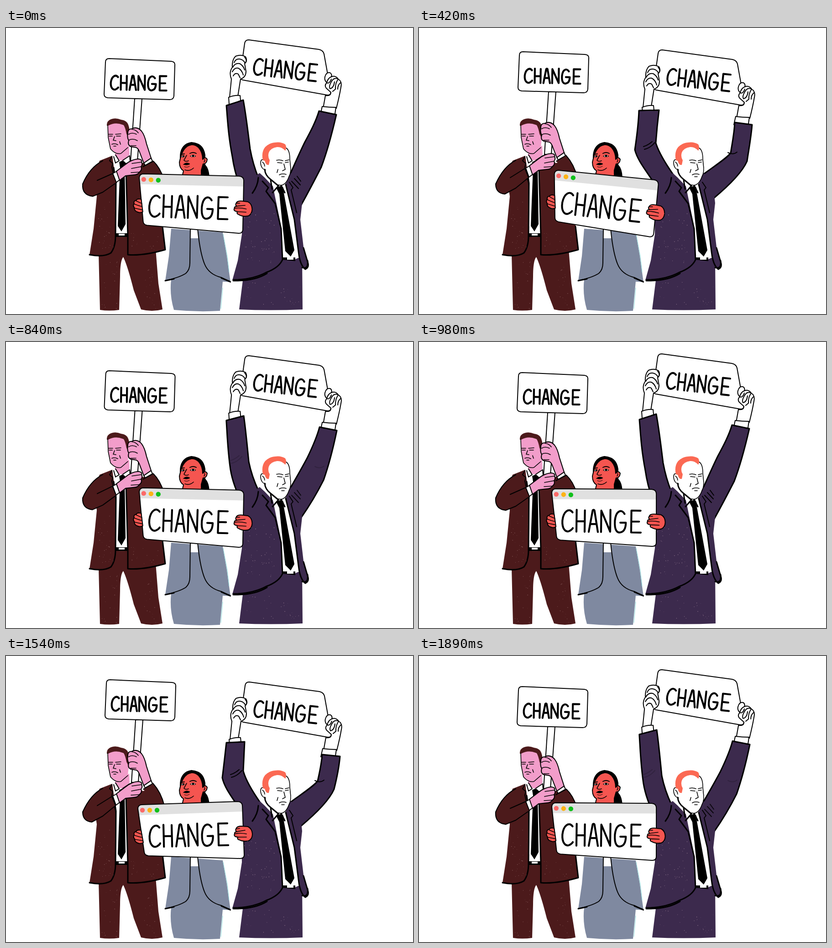
An HTML page that plays this animation: 892 by 627 pixels, repeating every 1960 ms.

```html
<!DOCTYPE html>
<html lang="en">
<head>
<meta charset="utf-8">
<title>Change</title>
<style>
html, body { margin: 0; width: 100%; height: 100%; overflow: hidden; background: #fff; }
svg { display: block; width: 100%; height: 100%; }
.ink { fill: none; stroke: #000; stroke-width: 2; stroke-linecap: round; stroke-linejoin: round; }
.ink .bold { stroke-width: 3; }
.ink .fine { stroke-width: 1.6; }
.brown { fill: #4c1a1b; }
.pink { fill: #f29dca; }
.red { fill: #f55550; }
.slate { fill: #7f89a0; }
.plum { fill: #3c2a4d; }
.white { fill: #fff; }
.black { fill: #000; }
.none { stroke: none; }
.word { stroke-width: 4.2; }
#word path { vector-effect: non-scaling-stroke; }
</style>
</head>
<body>
<svg viewBox="0 0 892 627" role="img" aria-label="Three people hold signs reading CHANGE">
<defs>
  <g id="word" aria-label="CHANGE">
    <path d="M22 7C14 -4 2 5 0 26C-1 46 8 53 15 50Q21 47 23 43"/>
    <path d="M31 1V51M49 2V51M31 27H49"/>
    <path d="M58 51L66 2Q68 -1 70 2L78 51M61 33H75"/>
    <path d="M85 51V2L105 50V0"/>
    <path d="M136 9C130 -2 117 0 115 25C114 48 121 53 128 51C136 49 139 40 139 29H127"/>
    <path d="M171 1H151V51H172M151 26H168"/>
  </g>
</defs>

<g class="ink">
  <!-- man with the placard -->
  <g>
    <path class="brown none" d="M203 495L206 618Q226 621 248 618L250 545Q250 510 257 502Q266 520 280 575L296 617Q320 623 343 617L334 560L328 485L268 455H240L225 480Z"/>
    <path class="white none" d="M233 283L268 280L270 450H238Z"/>
    <path class="black none" d="M248 294L258 289L264 297L260 306L262 430L253 446L245 434L250 306ZM240 450H268V458H240Z"/>
    <path class="white none" d="M247 451h13v4h-13z"/>
    <path class="brown none" d="M233 280L205 291L193 330L199 369L192 440L183 497Q215 503 230 493Q240 480 240 455L241 340Z"/>
    <path class="brown none" d="M268 282L300 296L318 292L345 325L343 435L349 487Q300 500 268 497L267 455L263 310Z"/>
    <path class="bold" d="M183 497Q215 503 230 493Q240 480 240 455L241 340L236 306M267 497Q300 500 349 486L343 435M267 497Q267 480 267 455L263 310"/>
    <path d="M232 282L227 291L234 297L232 305L241 345"/>
    <path class="pink none" d="M241 270L270 258L271 278L256 291L244 288L238 280Z"/>
    <path class="white" d="M236 282L240 296L248 291L240 278M256 290L271 280L272 292L264 297"/>
    <path class="pink none" d="M223 210L224 240L229 264Q240 277 252 275L267 261L271 225L262 208L240 204Z"/>
    <path class="brown none" d="M221 214Q220 204 230 200Q240 196 252 201Q265 203 268 212Q273 224 268 240L264 232Q262 220 258 213Q240 205 224 214Z"/>
    <path class="fine" d="M223 213L224 240L229 265Q240 278 252 275L267 262"/>
    <path class="fine" d="M225 233L234 233M240 233L252 232M226 237L233 237M242 237L251 237M238 238L235 246L241 247M232 255Q238 252 245 256M236 259L241 259M249 249L251 255"/>
    <g id="stick">
      <path class="white" d="M282 155L273 292H288L298 155Z"/>
      <path class="white" d="M226 67L362 73Q371 74 370 82L368 149Q367 157 359 157L223 153Q215 152 215 145L218 75Q218 67 226 67Z"/>
      <use href="#word" class="word" transform="translate(230 103) rotate(.9) scale(.71 .63)"/>
    </g>
    <path id="farSleeve" class="brown"/>
    <g id="hands">
      <path class="white" d="M302 296L318 285L321 292L305 301Z"/>
      <path class="pink" d="M267 232Q266 221 276 221Q287 215 297 226Q304 235 308 254L318 285L302 296L292 270Q289 263 285 262L273 260Q266 256 269 247Q265 240 267 232Z"/>
      <path class="fine" d="M269 233Q276 228 286 233M269 246Q278 241 288 247M273 258L285 258M276 222Q285 223 290 230"/>
      <path class="white" d="M234 319L243 314L249 333L241 339Z"/>
      <path class="pink" d="M242 314L262 299Q275 288 290 287Q299 288 297 294Q300 299 296 304Q299 311 292 316Q289 322 280 322L262 324L249 334Z"/>
      <path class="fine" d="M297 294L276 297M296 304L275 308M292 316L274 317"/>
    </g>
    <path id="nearSleeve" class="brown"/>
  </g>

  <!-- man with raised arms -->
  <g>
    <path class="plum none" d="M520 545L511 617Q580 620 650 617L649 500L632 508H607Z"/>
    <path class="white none" d="M580 340L615 335L640 430L644 504L606 504Z"/>
    <g id="raised">
      <path class="white" d="M532 26L686 47Q695 49 697 57L712 140Q712 148 704 147L519 114Q511 112 513 105L523 34Q524 26 532 26Z"/>
      <use href="#word" class="word" transform="translate(546 65) rotate(6.1) scale(.8 .73)"/>
      <path class="white" d="M494 112Q488 98 496 86Q495 70 503 62Q515 57 525 63Q530 72 523 78L526 95Q526 108 514 112L508 150L490 152Z"/>
      <path d="M500 76Q503 67 512 68Q520 69 524 77M497 86Q502 76 512 78Q520 82 523 92M496 96Q501 86 509 88Q517 92 520 103M498 105Q502 97 509 101L513 109M523 64Q529 70 525 76"/>
      <path class="white" d="M488 152Q500 147 513 148L516 178L490 182Z"/>
      <path class="white" d="M699 107Q702 96 710 98Q715 101 713 107Q722 103 728 112Q737 117 734 130Q731 148 724 176H695L700 148Q712 150 712 141L702 132Q697 126 703 120Q697 114 699 107Z"/>
      <path d="M713 107Q705 110 703 120Q709 123 713 112M728 112Q719 107 713 118Q707 128 710 133Q718 132 720 118M728 112Q721 122 722 134L716 139M733 120Q727 125 727 134"/>
      <path class="white" d="M693 172Q708 174 723 174L720 195L689 190Z"/>
    </g>
    <path id="leftArm" class="plum bold"/>
    <path id="rightArm" class="plum bold"/>
    <path class="plum none" d="M556 318L514 345L517 452L508 510L496 553Q560 555 606 508L602 430L585 347L567 328Z"/>
    <path class="plum none" d="M624 318L612 343L632 420L641 490Q644 520 656 529Q664 526 662 516L652 480L645 420L649 384L645 345Z"/>
    <path class="bold" d="M553 328Q552 346 540 362M498 552Q540 552 570 536Q598 526 606 508L603 440L590 385L570 358L575 350L562 336M613 343L632 420L641 490Q644 520 656 529Q664 525 662 516L652 482"/>
    <path d="M621 338L629 350L625 355L637 405"/>
    <path class="bold" d="M498 554Q545 555 572 538M649 525Q663 530 661 510"/>
    <path id="shoulderFolds" d="M626 336L641 352M632 330L645 344M638 325L646 336"/>
    <path id="elbowFolds" d="M494 266Q507 263 517 251M492 260Q502 257 511 249M677 273Q688 279 697 272"/>
    <path class="black none" d="M592 350L601 345L608 350L609 362L632 487L624 501L612 489L599 364ZM606 503L634 503V511L606 508Z"/>
    <path class="white none" d="M616 503h14v5h-14z"/>
    <path class="white none" d="M570 270Q590 252 612 261Q623 268 622 288L624 312Q622 330 608 344L597 348L573 322L567 310Q556 305 559 290Z"/>
    <path class="fine" d="M614 263Q622 268 622 287L623 298Q626 316 620 326Q614 343 603 345L597 344M567 290Q558 285 558 297Q560 310 569 311M562 294Q566 296 567 303"/>
    <path class="bold" d="M567 310Q568 323 580 332L597 346M580 333L583 353M597 346L584 361M603 345L611 361"/>
    <path class="none" fill="#fb6953" d="M563 290Q559 272 568 261Q577 252 590 251Q602 249 612 255Q616 262 612 269Q604 260 594 261Q580 263 576 273Q573 282 578 290L576 300Q570 302 567 291Z"/>
    <path class="fine" d="M593 290Q600 288 607 291M612 291L620 289M595 295L605 296M612 295L619 294M609 298L612 310L606 313M599 322Q605 318 614 321M604 326L610 326M596 310L594 317"/>
  </g>

  <!-- woman with the window -->
  <g>
    <path class="slate none" d="M362 440L357 500L349 554L362 551Q358 585 368 618Q420 623 469 620L475 556L492 557L484 500L475 448Z"/>
    <path d="M476 452L485 500L489 535M475 570L471 615" stroke="#a6e4e4" stroke-width="1.3"/>
    <path class="white none" d="M404 435H420L422 461H404Z"/>
    <path d="M349 554Q380 547 394 538Q403 530 403 515L404 440M420 440Q425 492 435 517Q444 540 472 547L492 557"/>
    <path class="bold" d="M349 554L368 550M472 548L491 556"/>
    <path class="black none" d="M381 286Q380 262 396 253Q408 248 422 254Q435 261 437 280L437 300Q445 308 446 327H427L425 285Z"/>
    <path class="red" d="M382 286Q386 268 397 259Q410 251 422 262Q431 272 431 288Q437 281 441 288Q440 298 432 298L428 312V326H386L389 313Q380 308 380 294Z"/>
    <path class="black none" d="M382 284Q387 268 398 260Q409 254 418 258Q430 265 432 284L437 281Q434 252 406 250Q382 255 382 284Z"/>
    <path d="M384 277L391 276M403 275Q410 271 417 275"/>
    <g stroke-width="1">
      <path class="white" d="M384 282Q388 277 392 281Q388 285 384 282ZM404 281Q409 276 416 281Q409 284 404 281Z"/>
      <path class="black" d="M389 299Q395 293 403 298Q397 302 389 299Z"/>
      <path d="M391 304Q397 307 402 303"/>
    </g>
    <path class="black none" d="M387 279h3v4h-3zM408 278h4v4h-4z"/>
    <path class="fine" d="M396 279L390 290Q394 294 400 291M435 288Q437 290 434 294M392 311Q402 315 411 307"/>
    <g id="board">
      <path class="white none" d="M297 326L507 319Q517 319 518 328L522 436Q522 444 513 444L312 438Q304 437 303 430L289 335Q289 327 297 326Z"/>
      <path class="none" fill="#e0e0e0" d="M297 327L507 320Q517 320 517 328L518 341L291 349L289 335Q289 328 297 327Z"/>
      <path d="M297 326L507 319Q517 319 518 328L522 436Q522 444 513 444L312 438Q304 437 303 430L289 335Q289 327 297 326Z"/>
      <g class="none">
        <circle cx="299" cy="338" r="5.2" fill="#fb6a68"/>
        <circle cx="315" cy="338" r="5.2" fill="#fcb316"/>
        <circle cx="331" cy="338" r="5.2" fill="#12c01c"/>
      </g>
      <use href="#word" class="word" transform="translate(314 370) rotate(-1.4) scale(1 .96)"/>
      <path class="red" d="M296 382Q287 380 285 385Q279 386 281 392Q278 397 282 401Q282 408 289 410Q295 413 301 409Z"/>
      <path class="fine" d="M285 386Q292 389 298 391M281 393Q290 396 299 398M282 402L300 405"/>
      <path class="red" d="M504 379Q506 373 515 373L530 374Q539 378 540 390Q540 401 532 405Q520 408 511 403Q506 402 508 397Q498 396 501 390Q500 386 506 385Q502 383 504 379Z"/>
      <path class="fine" d="M506 385L524 382M501 390Q512 387 527 390M508 397L527 397M504 379L512 378"/>
    </g>
  </g>
  <g class="none" id="grain"></g>
</g>
</svg>
<script>
const STEP = 70, STEPS = 28;

// Each animated attribute blends its poses in turn.
const moves = {
  placard: [
    ["stick", "transform", "translate(0 0)", "translate(2 -15)"],
    ["hands", "transform", "translate(0 0)", "translate(0 -12)"],
    ["farSleeve", "d",
      "M300 304L323 292Q338 306 346 332L346 350",
      "M301 292L322 279Q340 299 347 328L347 350"],
    ["nearSleeve", "d",
      "M212 291Q183 306 168 342Q166 366 190 369L212 360L242 339L234 319L200 334",
      "M212 290Q185 304 168 342Q168 362 188 364L212 351L240 328L232 308L200 328"]
  ],
  raise: [
    ["raised", "transform", "translate(0 0)", "translate(1 22)", "translate(1 31)"],
    ["leftArm", "d",
      "M514 350C506 330 500 310 496 282C488 240 486 210 483 170L520 158C526 190 530 225 535 265Q541 298 553 328",
      "M522 352C507 323 480 295 473 267C477 240 481 210 482 181L526 180C523 205 521 225 519 252Q527 278 557 321",
      "M522 352C507 323 480 295 474 267C477 244 480 216 483 190L523 188C522 210 521 230 520 252Q527 278 557 321"],
    ["rightArm", "d",
      "M622 322C634 295 645 270 655 250C668 226 679 205 686 182L724 190C716 225 706 265 691 305Q668 350 647 388",
      "M624 320C650 301 675 285 683 274C686 255 691 230 692 207L730 212C728 240 722 270 719 292Q705 324 645 374",
      "M624 320C650 301 675 285 683 274C686 260 691 240 693 216L732 220C730 245 724 272 719 292Q705 324 645 374"],
    ["shoulderFolds", "opacity", "1", "0", "0"],
    ["elbowFolds", "opacity", "0", "1", "1"]
  ],
  tilt: [
    ["board", "transform", "rotate(0 407 385)", "rotate(7.6 407 385)"]
  ]
};

// Timing as [step, pose] pairs.
const timing = {
  placard: [[0, 0], [1, 0], [4, .8], [6, 1], [8, 1], [10, .8], [13, 0], [14, 0]],
  raise: [[0, 0], [2, 0], [4, .18], [6, 1], [8, 2], [10, 1], [12, .18], [13, .18], [14, 0]],
  tilt: [[0, .43], [5, 1], [6, 1], [10, .57], [14, .29], [18, 0], [22, 0], [27, .29], [28, .43]]
};

function poseAt(keys, step) {
  step %= keys[keys.length - 1][0];
  const i = keys.findIndex(key => key[0] > step);
  const [a, from] = keys[i - 1], [b, to] = keys[i];
  return from + (to - from) * (step - a) / (b - a);
}

function mix(poses, at) {
  const number = /-?\d+(\.\d+)?/g;
  const i = Math.min(Math.floor(at), poses.length - 2), u = at - i;
  const next = poses[i + 1].match(number);
  let n = 0;
  return poses[i].replace(number, v => (+v + (next[n++] - v) * u).toFixed(2));
}

// Paper grain on the dark cloth: colour, count, then x, y, width, height.
let seed = 7;
const random = () => (seed = seed * 16807 % 2147483647) / 2147483647;
const cloth = [
  ["#8c6060", 30, 200, 375, 38, 115], ["#8c6060", 20, 210, 510, 36, 105],
  ["#8c6060", 18, 298, 510, 30, 105], ["#8c6060", 18, 274, 450, 62, 36],
  ["#9a7f94", 45, 522, 400, 68, 115], ["#9a7f94", 28, 525, 555, 120, 58]
];
document.getElementById("grain").innerHTML = cloth.map(([color, count, x, y, w, h]) => {
  let d = "";
  for (let i = 0; i < count; i++) {
    const r = .5 + random() * .8;
    d += `M${x + random() * w} ${y + random() * h}h${r}v${r}h${-r}z`;
  }
  return `<path fill="${color}" d="${d}"/>`;
}).join("");

let shown = -1;
function draw() {
  const step = Math.floor(performance.now() / STEP) % STEPS;
  if (step !== shown) {
    shown = step;
    for (const part in moves) {
      const at = poseAt(timing[part], step);
      for (const [id, attr, ...poses] of moves[part])
        document.getElementById(id).setAttribute(attr, mix(poses, at));
    }
  }
  requestAnimationFrame(draw);
}
draw();
</script>
</body>
</html>
```
